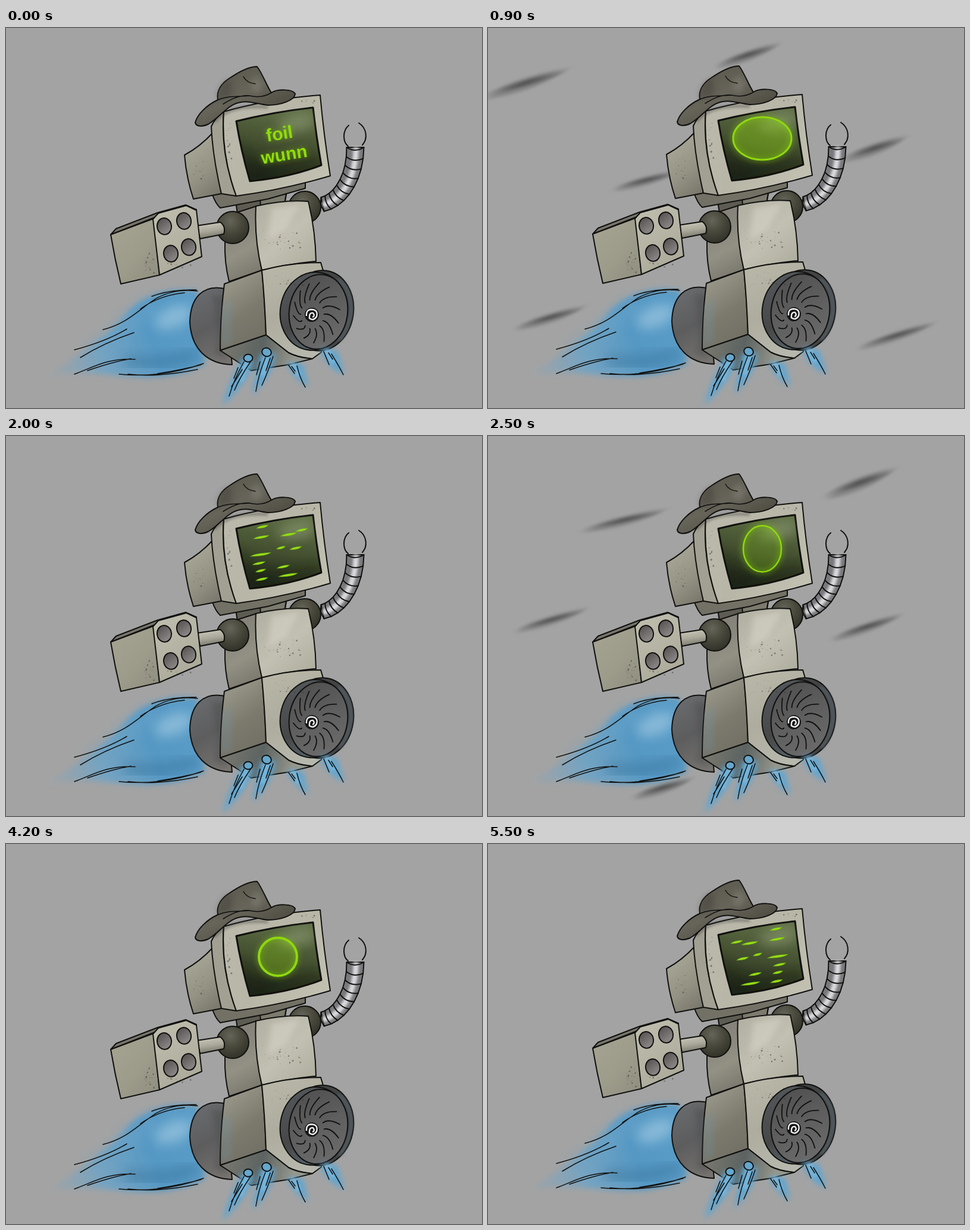
Recreate the animation shown at these times as an HTML page. Size 800x640 px, loop 5600 ms.

```html
<!DOCTYPE html>
<html lang="en">
<head>
<meta charset="utf-8">
<title>Flying robot</title>
<style>
html, body { margin: 0; width: 100%; height: 100%; overflow: hidden; background: #a3a3a3; }
svg { display: block; width: 100vw; height: 100vh; }
.ink { stroke: #10100e; stroke-width: 2; stroke-linejoin: round; stroke-linecap: round; }
.line { fill: none; stroke: #10100e; stroke-width: 1.5; stroke-linecap: round; }
.term { font: bold 30px "Liberation Sans", Arial, sans-serif; fill: #8fdd0b; text-anchor: middle; }
</style>
</head>
<body>
<svg viewBox="0 0 800 640" preserveAspectRatio="none">
<defs id="defs">
  <filter id="b2" x="-50%" y="-50%" width="200%" height="200%"><feGaussianBlur stdDeviation="2"/></filter>
  <filter id="b5" x="-50%" y="-50%" width="200%" height="200%"><feGaussianBlur stdDeviation="5"/></filter>
  <filter id="b10" x="-60%" y="-60%" width="220%" height="220%"><feGaussianBlur stdDeviation="10"/></filter>
  <radialGradient id="ball" cx=".42" cy=".3" r=".75">
    <stop offset="0" stop-color="#66655a"/><stop offset=".45" stop-color="#4b4a3d"/><stop offset="1" stop-color="#302f27"/>
  </radialGradient>
  <radialGradient id="smoke">
    <stop offset="0" stop-color="#3c3c3c" stop-opacity=".92"/><stop offset=".4" stop-color="#4b4b4b" stop-opacity=".65"/>
    <stop offset="1" stop-color="#777" stop-opacity=".08"/>
  </radialGradient>
  <linearGradient id="bore" x1="0" y1="0" x2=".5" y2="1">
    <stop offset="0" stop-color="#4f4b4b"/><stop offset="1" stop-color="#8c8787"/>
  </linearGradient>
  <clipPath id="glass"><path id="pane" d="M387 157Q450 141 516 134Q521 180 530 231Q476 252 410 258Q395 207 387 157Z"/></clipPath>
</defs>
<g id="streaks"></g>
<g id="robot">
  <!-- main exhaust -->
  <path d="M322 443C275 436 235 448 205 478C185 510 130 545 72 586C140 574 190 590 245 588C290 586 318 576 334 565Z" fill="url(#flame)" filter="url(#b5)"/>
  <path d="M240 455Q195 480 175 510L120 545L205 520L260 470Z" fill="#6ba4c9" opacity=".45" filter="url(#b10)"/>
  <ellipse cx="282" cy="487" rx="34" ry="17" fill="#a3cae2" opacity=".65" filter="url(#b10)" transform="rotate(-22 282 487)"/>
  <path d="M200 560Q260 570 322 548" fill="none" stroke="#2f688f" stroke-width="18" opacity=".45" filter="url(#b10)"/>
  <path class="line" d="M163 508C203 498 220 477 250 457Q280 438 322 443M226 473Q258 450 300 446M245 452Q275 440 320 441M115 542Q168 528 203 507M125 555Q165 530 215 513M115 583C150 570 170 556 217 558M137 577Q180 562 210 557M190 583C240 588 290 580 332 565M255 582Q300 575 328 567M205 583Q255 589 322 575"/>
  <path class="ink" d="M368 439C330 431 310 455 309 495C311 540 338 566 380 567Z" fill="url(#engine)"/>
  <path d="M345 450Q363 500 349 548L370 560V450Z" fill="#38383a" opacity=".25" filter="url(#b5)"/>

  <!-- far arm -->
  <circle class="ink" cx="502" cy="302" r="27" fill="url(#ball)"/>
  <g id="hose"></g>
  <path class="line" style="stroke-width:2" d="M576 164C565 173 566 192 575 199M593 160C607 169 608 187 599 197"/>

  <!-- neck -->
  <path class="ink" d="M385 285L389 313L468 298L472 274Z" fill="#5e5c52"/>
  <path class="ink" d="M427 287L428 301L468 296L471 279Z" fill="#7c7a6d"/>
  <path class="ink" d="M346 278Q352 296 360 303L440 288L503 270V258Z" fill="#737165"/>

  <!-- torso -->
  <path class="ink" d="M368 362Q373 325 390 310L421 300Q418 350 430 408L375 427Q367 395 368 362Z" fill="url(#side)"/>
  <path class="ink" d="M420 300Q468 289 508 292Q520 340 521 393Q475 397 430 408Q417 355 420 300Z" fill="url(#chest)"/>
  <path d="M446 304L494 297L470 340L440 358Z" fill="#dad8cc" opacity=".5" filter="url(#b5)"/>

  <!-- hull -->
  <path class="ink" d="M367 431L430 408Q435 460 437 517L360 543Q360 485 367 431Z" fill="url(#hull)"/>
  <path class="ink" d="M430 408Q478 395 529 395L534 412L530 546L515 557Q490 555 475 547L437 517Q435 460 430 408Z" fill="url(#front)"/>
  <path class="ink" d="M360 543L437 517L475 547Q490 555 515 557L475 567L412 577Z" fill="url(#under)"/>
  <path d="M363 470L380 455L378 530L364 536Z" fill="#6b94ad" opacity=".25" filter="url(#b5)"/>

  <!-- turbine -->
  <ellipse class="ink" cx="529" cy="476" rx="55" ry="68" fill="#414344" transform="rotate(8 529 476)"/>
  <path d="M558 424Q581 440 580 478Q574 510 560 527" fill="none" stroke="#5f6a72" stroke-width="7" opacity=".55" filter="url(#b2)"/>
  <ellipse class="ink" cx="517" cy="477" rx="56" ry="66" fill="url(#ring)" transform="rotate(10 517 477)"/>
  <ellipse class="ink" cx="525" cy="478" rx="49" ry="63" fill="url(#disc)" transform="rotate(8 525 478)"/>
  <g id="blades"></g>
  <circle cx="514" cy="483" r="12" fill="#151515"/>
  <path d="M505 485Q504 474 514 474Q525 475 522 486Q517 494 510 489Q509 479 516 480Q520 485 515 487" fill="none" stroke="#eee" stroke-width="2.4"/>

  <!-- lift jets -->
  <g filter="url(#b5)" fill="#5fa5d0">
    <path d="M398 556L416 558Q412 590 364 636Q372 600 398 556Z"/>
    <path d="M429 547L453 549Q448 585 414 618Q420 580 429 547Z"/>
    <path d="M471 564L499 566L508 605Q486 592 471 564Z"/>
    <path d="M528 541L556 543L569 584Q538 572 528 541Z"/>
  </g>
  <path d="M406 558L395 592M439 549L432 582M482 568L491 583M540 545L549 561" stroke="#7fbbdf" stroke-width="9" stroke-linecap="round" opacity=".7" filter="url(#b2)"/>
  <path class="line" d="M400 562Q383 592 375 620M411 562Q392 590 384 610M397 575L379 604M390 572L383 590M436 555Q424 585 420 612M449 553Q440 580 430 602M444 556L437 577M427 562L421 584M475 568L485 582M480 570L486 578M489 569Q494 590 503 605M534 545L543 567M547 549Q559 568 567 584M542 547L549 558"/>
  <ellipse class="ink" cx="407" cy="556" rx="7.5" ry="6.5" fill="#65a7cd"/>
  <ellipse class="ink" cx="438" cy="546" rx="8" ry="7" fill="#65a7cd" transform="rotate(25 438 546)"/>

  <!-- near arm and launcher -->
  <circle class="ink" cx="381" cy="336" r="27" fill="url(#ball)"/>
  <path class="ink" d="M321 333L360 327Q370 334 366 347L326 355Z" fill="url(#rod)"/>
  <path class="ink" d="M176 348L185 338L255 311L302 298L320 306L250 319Z" fill="#77756a"/>
  <path class="ink" d="M176 348L248 321L258 416L193 431Q183 390 176 348Z" fill="url(#gunside)"/>
  <path class="ink" d="M247 322L256 312L303 299L320 307L329 385L258 416Z" fill="url(#gunface)"/>
  <g id="bores"></g>

  <!-- monitor -->
  <path class="ink" d="M300 214Q326 200 348 176L362 279L315 288Q303 252 300 214Z" fill="url(#back)"/>
  <path class="ink" d="M345 166Q352 150 366 141Q360 210 387 283L362 279Q347 215 345 166Z" fill="#a2a092"/>
  <path class="ink" d="M366 141Q440 120 528 113Q534 180 545 249Q468 272 387 283Q361 212 366 141Z" fill="url(#bezel)"/>
  <use href="#pane" class="ink" style="stroke-width:3" fill="url(#tube)"/>
  <g clip-path="url(#glass)">
    <ellipse cx="488" cy="160" rx="32" ry="13" fill="#93a17a" opacity=".6" filter="url(#b10)" transform="rotate(-10 488 160)"/>
    <path d="M387 195L410 258L530 231L526 215Q470 238 420 228Z" fill="#161c11" opacity=".5" filter="url(#b10)"/>
    <g id="screen"></g>
  </g>
  <g id="dirt"></g>

  <!-- hat -->
  <path d="M350 158Q375 128 440 133" fill="none" stroke="#222" stroke-width="5" opacity=".35" filter="url(#b2)"/>
  <path class="ink" d="M356 121C353 104 364 92 375 85C391 74 409 65 422 65C430 75 438 97 446 109C455 103 482 102 486 111C485 122 462 130 440 130C421 128 407 121 390 126C371 131 358 152 340 162C329 167 319 166 318 159C322 145 337 130 356 121Z" fill="url(#hat)"/>
  <path d="M356 121C353 104 364 92 375 85Q383 100 378 116Z" fill="#393730" opacity=".35" filter="url(#b5)"/>
  <ellipse cx="421" cy="96" rx="9" ry="14" fill="#86837a" opacity=".45" filter="url(#b5)"/>
  <path class="line" d="M356 121C375 113 395 116 409 114M409 114Q430 119 446 109M399 82Q405 93 419 94M365 128Q390 112 409 114"/>
</g>
</svg>
<script>
const $ = id => document.getElementById(id);
const LOOP = 5600, STEP = 100;

const shade = (id, x1, y1, x2, y2, ...stops) =>
  `<linearGradient id="${id}" gradientUnits="userSpaceOnUse" x1="${x1}" y1="${y1}" x2="${x2}" y2="${y2}">` +
  stops.map((c, i) => `<stop offset="${i / (stops.length - 1)}" stop-color="${c}"/>`).join("") + "</linearGradient>";

$("defs").insertAdjacentHTML("beforeend",
  shade("flame", 75, 580, 325, 490, "#7fa5bd33", "#6aa3c8d0", "#5598c4", "#5a9cc7") +
  shade("engine", 309, 445, 375, 560, "#6a6c6f", "#5d5d5e", "#777470") +
  shade("side", 375, 330, 425, 420, "#85837a", "#939184", "#77756a") +
  shade("chest", 430, 300, 520, 400, "#b3b1a3", "#c2c0b2", "#aeac9d") +
  shade("hull", 365, 430, 437, 530, "#99978a", "#7c7a6d", "#706e63") +
  shade("front", 435, 410, 500, 550, "#b8b6a7", "#aeac9e", "#b7b8ad") +
  shade("under", 370, 540, 480, 570, "#76766d", "#5c6361", "#96978c") +
  shade("ring", 470, 420, 570, 540, "#54595c", "#474748", "#5c7480") +
  shade("disc", 485, 425, 565, 535, "#505051", "#5f5f60", "#6c6c6d") +
  shade("rod", 342, 328, 346, 354, "#c7c5b7", "#aaa899", "#77756a") +
  shade("gunside", 180, 350, 258, 420, "#a3a18f", "#9d9b8a", "#908e7f") +
  shade("gunface", 255, 310, 325, 400, "#bfbdad", "#b5b3a3", "#aaa898") +
  shade("back", 305, 210, 362, 280, "#a5a393", "#949283", "#77756a") +
  shade("bezel", 370, 140, 540, 260, "#bbb9ab", "#b8b6a7", "#c3c1b2") +
  shade("tube", 475, 138, 452, 255, "#5f6e46", "#445030", "#20281a") +
  shade("hat", 360, 80, 400, 160, "#5c594e", "#67645a", "#514e44"));

const line = (d, w = 1.5) => `<path class="line" d="${d}" style="stroke-width:${w}"/>`;

// Ribbed hose: offset points along one cubic.
function hose() {
  const X = [532, 560, 587, 587], Y = [297, 291, 255, 201];
  const cubic = (p, t) => (1-t)**3*p[0] + 3*t*(1-t)**2*p[1] + 3*t*t*(1-t)*p[2] + t**3*p[3];
  const at = (t, side) => {
    const e = .01, dx = cubic(X, t+e) - cubic(X, t-e), dy = cubic(Y, t+e) - cubic(Y, t-e);
    const k = side * (12 + 2.5*t) / Math.hypot(dx, dy);
    return `${(cubic(X, t) - dy*k).toFixed(1)} ${(cubic(Y, t) + dx*k).toFixed(1)}`;
  };
  const ts = Array.from({length: 10}, (_, i) => i / 9);
  const edge = s => ts.map(t => at(t, s));
  return `<path class="ink" d="M${edge(1).join("L")}L${edge(-1).reverse().join("L")}Z" fill="#78777b"/>` +
    `<path d="M${edge(.1).join("L")}" fill="none" stroke="#dcdcdf" stroke-width="9" filter="url(#b2)"/>` +
    ts.map(t => line(`M${at(t, 1)}Q${at(t - .06, 0)} ${at(t, -1)}`, 2)).join("");
}
$("hose").innerHTML = hose();

// Blades run from the off-centre hub to the rim of the disc.
$("blades").innerHTML = Array.from({length: 14}, (_, i) => {
  const p = (k, turn) => {
    const a = i * Math.PI / 7 + turn;
    return `${(513 + 10*k + (14 + 28*k) * Math.cos(a)).toFixed(1)} ${(483 - 4*k + (17 + 38*k) * Math.sin(a)).toFixed(1)}`;
  };
  return line(`M${p(.2, 0)}Q${p(.5, -.05)} ${p(.9, .35)}`, 1.8);
}).join("");

$("bores").innerHTML = [[266, 334], [299, 325], [277, 380], [307, 369]].map(([x, y]) =>
  `<ellipse class="ink" cx="${x}" cy="${y}" rx="12" ry="14" fill="url(#bore)" transform="rotate(-8 ${x} ${y})"/>`).join("");

// Grime as seeded specks: x, y, spread x, spread y, count.
let seed = 7;
const rnd = () => (seed = seed * 16807 % 2147483647) / 2147483647;
$("dirt").innerHTML = [[238, 397, 13, 20, 32], [465, 358, 40, 20, 40], [475, 425, 35, 14, 30],
  [322, 242, 17, 25, 20], [373, 205, 7, 50, 16], [505, 124, 18, 5, 8], [290, 398, 30, 7, 12]]
  .map(([x, y, w, h, n]) => Array.from({length: n}, () => {
    const px = x + (rnd() + rnd() - 1) * w, py = y + (rnd() + rnd() - 1) * h;
    return `<circle cx="${px.toFixed(1)}" cy="${py.toFixed(1)}" r="${(.4 + rnd() ** 4 * 1.2).toFixed(1)}" fill="#3c3a32" opacity=".5"/>`;
  }).join("")).join("");

const dashes = [[418,169,20],[440,171,27],[484,147,20],[486,164,26],[428,197,20],[453,190,15],
  [487,193,34],[490,207,21],[449,223,21],[487,220,17],[441,239,32],[485,235,20]];
const code = flip => dashes.map(([x, y, w]) => {
  const cx = flip ? 915 - x : x, cy = flip ? y + (x - 457) * .25 : y;
  return `<path d="M${-w/2} 2Q${-w/4} -2.5 ${w/2} -2Q${w/4} 3.5 ${-w/2} 2Z" transform="translate(${cx} ${cy}) rotate(-4)" fill="#98e016" stroke="#6fae14" stroke-opacity=".6"/>`;
}).join("");

const round = (x, y, rx, ry, w, fill) => {
  const box = `cx="${x}" cy="${y}" rx="${rx}" ry="${ry}"`;
  return `<ellipse ${box} fill="none" stroke="#7bc018" stroke-width="9" opacity=".4" filter="url(#b5)"/>` +
    `<ellipse ${box} fill="#8fd80f" fill-opacity="${fill}" stroke="#8fd80f" stroke-width="${w}"/>`;
};
const words = ["foil", "wunn"].map((s, i) =>
  `<text class="term" transform="translate(${i ? 469 : 461} ${i ? 223 : 188}) rotate(-9)">${s}</text>`).join("");
const quad = "M402 163L501 141L520 227L421 246Z";

const views = {
  words: `<g opacity=".5" filter="url(#b5)">${words}</g>${words}`,
  codeA: code(false),
  codeB: code(true),
  wide: round(461, 187, 49, 36, 3, .4),
  block: `<path d="${quad}" fill="#7de34a" opacity=".6" filter="url(#b10)"/><path d="${quad}" fill="#9bf968"/>`,
  tall: round(461, 191, 32, 39, 2.5, .22),
  disc: round(457, 192, 32, 32, 4, .3)
};

// Smoke: x, y, length, thickness, angle.
const smoke = list => list.map(([x, y, len, h, a]) => {
  const r = len / 2;
  return `<g transform="translate(${x} ${y}) rotate(${a})" filter="url(#b2)">` +
    `<path d="M${-r} 2Q0 ${-h} ${r} -2Q0 ${h} ${-r} 2Z" fill="url(#smoke)"/>` +
    `<path d="M${-r*.9} ${h*.35}Q0 ${-h*.3} ${r*.8} 1Q0 ${h*1.1} ${-r*.9} ${h*.35}Z" fill="#5a5a5a" opacity=".28"/></g>`;
}).join("");
const sets = {
  none: "",
  a: smoke([[64,92,172,19,-17],[437,45,132,16,-18],[266,256,132,14,-14],[650,202,132,18,-18],[105,487,142,15,-16],[688,517,156,14,-17]]),
  b: smoke([[626,78,146,20,-20],[230,141,168,15,-13],[107,309,146,14,-16],[637,321,144,15,-18],[294,592,122,16,-16]])
};
sets.late = `<g transform="translate(-12 4)">${sets.a}</g>`;

const screens = [[0,"words"],[200,"codeA"],[300,"codeB"],[400,"wide"],[1200,"codeA"],[1300,"codeB"],[1400,"block"],
  [1900,"codeA"],[2000,"codeB"],[2100,"tall"],[3300,"codeA"],[3400,"codeB"],[3500,"disc"],[5400,"codeB"],[5500,"codeA"]];
const gusts = [[0,"none"],[500,"a"],[600,"b"],[700,"none"],[900,"a"],[1000,"b"],[1100,"none"],[1700,"a"],[1800,"b"],[1900,"none"],
  [2300,"a"],[2400,"none"],[2500,"b"],[2600,"none"],[2700,"a"],[2800,"none"],[3500,"a"],[3600,"b"],[3700,"none"],
  [4000,"a"],[4100,"late"],[4200,"none"],[4300,"a"],[4400,"none"],[4600,"a"],[4700,"b"],[4800,"none"],[4900,"a"],[5000,"b"],[5100,"a"],[5200,"none"]];
const lift = [[0,0],[200,0],[700,-1],[900,-1],[1400,0],[1700,0],[2100,-1],[2500,-1],[2800,0],[3300,0],[3700,-2],[4600,-2],[5100,-4],[5600,-4]];

const held = (keys, t) => keys.filter(k => k[0] <= t).pop()[1];
function tween(keys, t) {
  const i = keys.findIndex(k => k[0] > t), [t0, a] = keys[i - 1], [t1, b] = keys[i];
  return a + (b - a) * (t - t0) / (t1 - t0);
}

const layer = (id, parts) => {
  $(id).innerHTML = Object.entries(parts).map(([k, v]) => `<g data-key="${k}">${v}</g>`).join("");
  return key => { for (const g of $(id).children) g.style.display = g.dataset.key === key ? "" : "none"; };
};
const showScreen = layer("screen", views), showGust = layer("streaks", sets);

function draw(now) {
  const t = Math.floor(now % LOOP / STEP) * STEP;
  showScreen(held(screens, t));
  showGust(held(gusts, t));
  $("robot").setAttribute("transform", `translate(0 ${Math.round(tween(lift, t))})`);
}
function tick() {
  draw(performance.now());
  requestAnimationFrame(tick);
}
tick();
</script>
</body>
</html>
```
